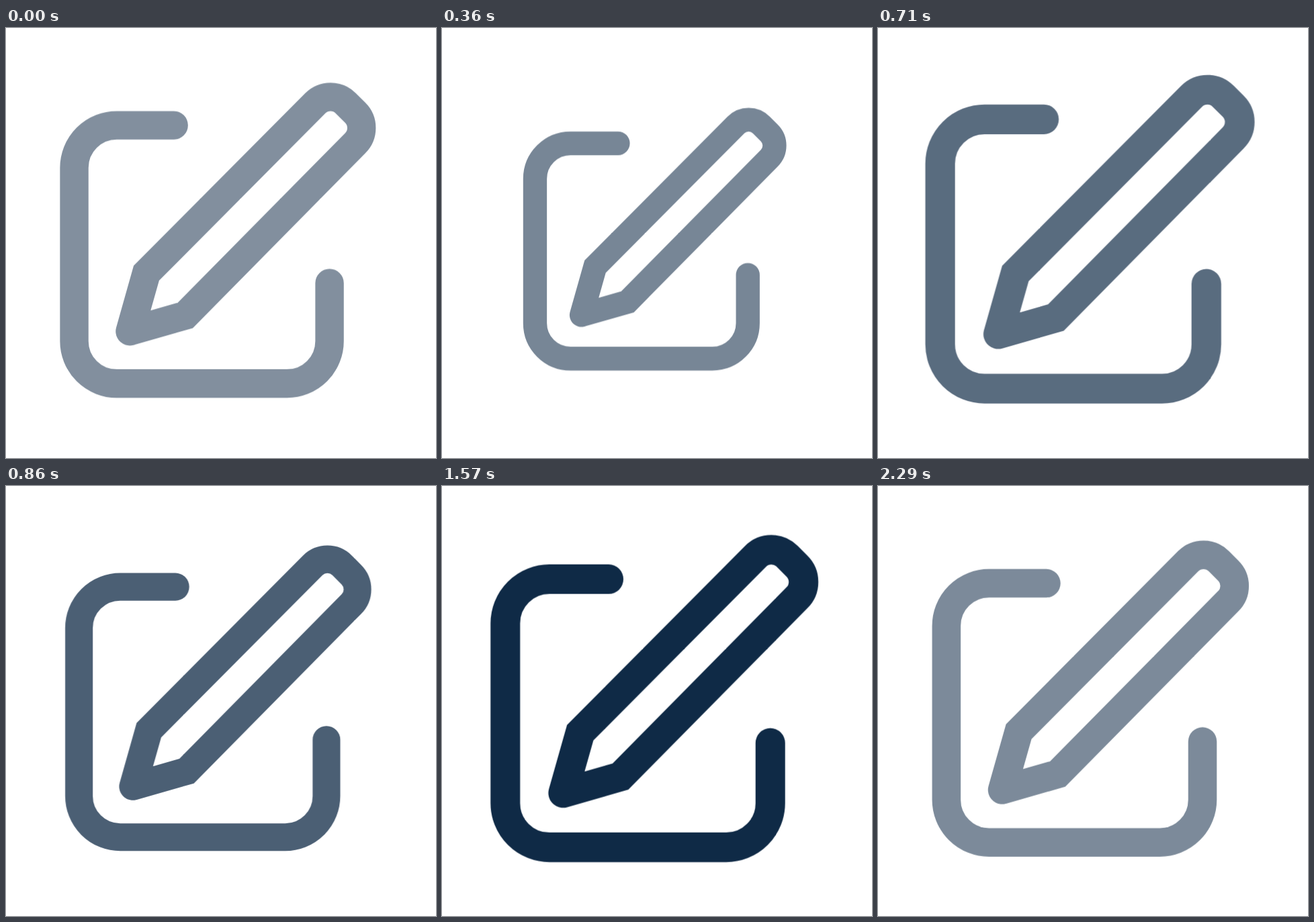
Recreate the animation shown at these times as an HTML page. Size 640 by 640 pixels, loop 2.37 s.

```html
<!DOCTYPE html>
<html lang="en">
<head>
<meta charset="utf-8">
<title>Edit icon</title>
<style>
  html, body { margin: 0; width: 100%; height: 100%; overflow: hidden; background: #fff; }
  svg { display: block; width: 100%; height: 100%; }

  .icon {
    fill: none;
    stroke: #0a2542;
    stroke-width: 2.01;
    stroke-linecap: round;
    animation: bounce 2370ms infinite paused, fade 2370ms infinite paused;
    animation-timing-function: cubic-bezier(.37, 0, .63, 1);
  }

  @keyframes bounce {
    0%     { transform: translate(315.5px, 315.75px) scale(21.1); }
    13.08% { transform: translate(317px, 314.5px) scale(16.71); }
    22.36% { transform: translate(314.8px, 311.2px) scale(24.85); }
    35.44% { transform: translate(316px, 315.7px) scale(20.45);
             animation-timing-function: cubic-bezier(.33, 0, .6, 1); }
    83.12%, 84.39% { transform: translate(316.4px, 316.2px) scale(22.37); }
    98.5%, 100% { transform: translate(316.4px, 316.2px) scale(21.1); }
  }

  @keyframes fade {
    0% { opacity: .51; }
    76.37%, 85.65% { opacity: 1; }
    98.5%, 100% { opacity: .505; }
  }
</style>
</head>
<body>
<svg viewBox="0 0 640 640">
  <g class="icon">
    <!-- open box -->
    <path d="M-3.12-8.1H-7.13a3 3 0 0 0-3.01 3V7.12a3 3 0 0 0 3.01 3H4.87a3 3 0 0 0 3-3V3.03"/>
    <!-- pencil, starting and ending at its tip -->
    <path d="M-6.21 6.43L-5.05 2.33L6.87-9.66A1.515 1.515 0 0 1 9.01-9.66L9.68-8.99A1.515 1.515 0 0 1 9.68-6.84L-2.31 5.31L-6.21 6.43"/>
  </g>
</svg>
<script>
  const LOOP = 2370, FPS = 14, LAST = 32;
  const anims = document.querySelector('.icon').getAnimations();
  const start = performance.now();

  // Motion advances in hard steps at 14 per second.
  function draw() {
    const t = (performance.now() - start) % LOOP;
    const step = Math.min(LAST, Math.floor(t * FPS / 1000 + 0.07));
    for (const a of anims) a.currentTime = step * 1000 / FPS;
    requestAnimationFrame(draw);
  }
  draw();
</script>
</body>
</html>
```
